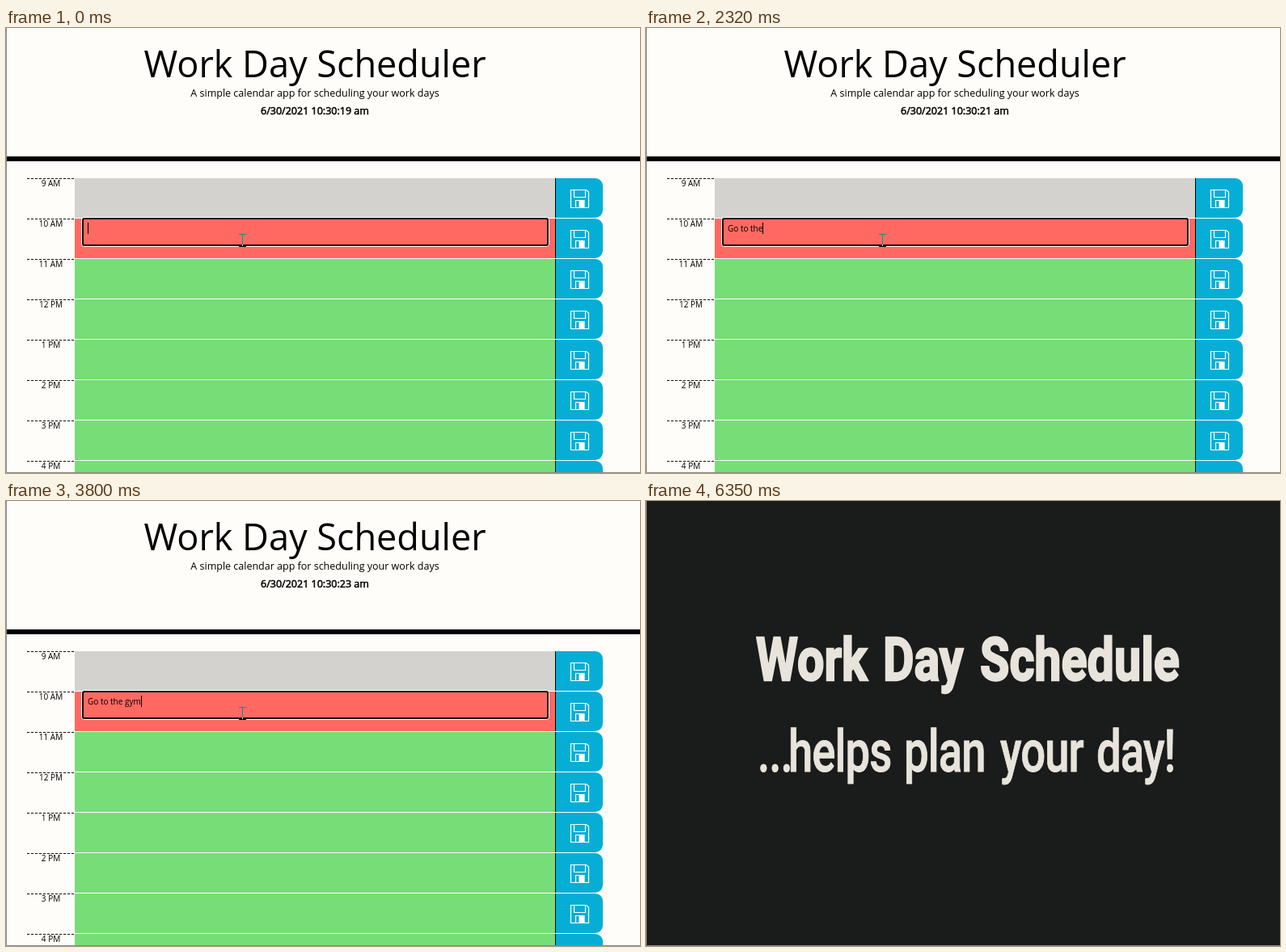
Recreate the animation shown at these times as an HTML page. Size 784 px wide and 551 px high, loop 8 s.

```html
<!DOCTYPE html>
<html lang="en">
<head>
<meta charset="utf-8">
<title>Work Day Scheduler</title>
<style>
  html, body { margin: 0; width: 100%; height: 100%; overflow: hidden; background: #fffdfa; }
  body { position: relative; font: 400 10px "Open Sans", sans-serif; color: #000; }
  svg { position: absolute; left: 0; top: 0; display: block; }
  .title { font-size: 45px; }
  .lead { font-size: 12.5px; }
  .clock { font-size: 12.5px; stroke: #000; stroke-width: .5px; }
  .mid { text-anchor: middle; }
  #note { position: absolute; left: 101px; top: 241px; height: 14px; line-height: 14px; white-space: pre; }
  #caret { display: inline-block; width: 1px; height: 14px; vertical-align: top; background: #000; }
  #pointer { mix-blend-mode: difference; }
  #card { visibility: hidden; font-family: Roboto, sans-serif; }
  #card text { fill: #e8e4dc; stroke: #e8e4dc; }
  .head { font-size: 75px; font-weight: 700; stroke-width: 2.4px; }
  .sub { font-size: 73px; font-weight: 500; stroke-width: 1px; letter-spacing: -1.2px; }
</style>
</head>
<body>
<svg width="784" height="551">
  <defs>
    <g id="save">
      <path d="M0 0H49.6A9.4 9.4 0 0 1 59 9.4V39.6A9.4 9.4 0 0 1 49.6 49H0Z" fill="#06aed5"/>
      <path d="M.5 0V49" stroke="#000"/>
      <g fill="none" stroke="#fff" stroke-width="1.2">
        <path d="M19.5 14.5H38.5L41.5 17V36.5H19.5Z"/>
        <path d="M23.5 14.5V23.5H37.5V14.5"/>
        <path d="M25.5 36.5V27.5H36V36.5"/>
      </g>
      <path d="M29.5 28H36V37H29.5Z" fill="#fff"/>
    </g>
  </defs>
  <rect width="784" height="551" fill="#fffdfa"/>
  <text class="title mid" x="382" y="61">Work Day Scheduler</text>
  <text class="lead mid" x="382" y="85">A simple calendar app for scheduling your work days</text>
  <text class="clock mid" x="382" y="107" id="clock"></text>
  <rect y="159" width="784" height="6"/>
  <g id="rows"></g>
  <rect x="93.5" y="234.5" width="578" height="36" rx="3.5" fill="none" stroke="#fff"/>
  <rect x="95" y="236" width="575" height="33" rx="2" fill="#ff6961" stroke="#101010" stroke-width="2"/>
  <path d="M.5 0V550.5H784" fill="none" stroke="#8a8a88"/>
</svg>
<div id="note"><span id="typed"></span><span id="caret"></span></div>
<svg id="pointer" width="784" height="551">
  <path id="beam" fill="#fff" d="M288 255H297V256H293V270H297V271H288V270H292V256H288Z"/>
</svg>
<svg id="card" width="784" height="551">
  <rect width="784" height="551" fill="#1a1b1b"/>
  <g id="words"></g>
  <path d="M.5 0V550.5H784" fill="none" stroke="#8a8486"/>
</svg>
<script>
const $ = id => document.getElementById(id);
const LOOP = 8000, CARD_AT = 6350;
const NOTE = 'Go to the gym.';

// [ms, value] steps
const TYPED = [[0, 0], [500, 1], [930, 2], [1050, 3], [1300, 4], [1610, 5], [1890, 7],
  [2010, 8], [2320, 9], [2470, 10], [2890, 11], [3430, 12], [3800, 13], [4200, 14]];
const SECOND = [[0, 19], [620, 20], [1610, 21], [2590, 22], [3550, 23], [4600, 24]];
const CARET = [[0, 1], [4870, 0], [5150, 1]];
const LIFT = [[0, 0], [4870, -2]];

const valueAt = (steps, t) => steps.filter(s => s[0] <= t).pop()[1];

const HOURS = ['9 AM', '10 AM', '11 AM', '12 PM', '1 PM', '2 PM', '3 PM', '4 PM'];
const fillOf = i => ['#d3d2ce', '#ff6961'][i] || '#77dd77';
$('rows').innerHTML = HOURS.map((hour, i) => `
  <g transform="translate(0 ${186 + i * 50})">
    <path d="M26 .5H85" stroke="#000" stroke-dasharray="3 2"/>
    <text class="mid" x="55.5" y="10">${hour}</text>
    <rect x="85" width="594" height="49" fill="${fillOf(i)}"/>
    <use href="#save" x="679"/>
  </g>`).join('');

const word = (kind, y, squeeze) => ([x, text]) =>
  `<text class="${kind}" transform="translate(${x} ${y}) scale(${squeeze} 1)">${text}</text>`;
$('words').innerHTML = [
  ...[[136, 'Work'], [293, 'Day'], [413, 'Schedule']].map(word('head', 222, .79)),
  ...[[138, '...'], [176, 'helps'], [319, 'plan'], [438, 'your'], [557, 'day!']].map(word('sub', 335, .745))
].join('');

function draw(t) {
  $('typed').textContent = NOTE.slice(0, valueAt(TYPED, t));
  $('clock').textContent = `6/30/2021 10:30:${valueAt(SECOND, t)} am`;
  $('caret').style.opacity = valueAt(CARET, t);
  $('beam').setAttribute('transform', `translate(0 ${valueAt(LIFT, t)})`);
  $('card').style.visibility = t >= CARD_AT ? 'visible' : 'hidden';
}

const start = performance.now();
function tick() {
  draw((performance.now() - start) % LOOP);
  requestAnimationFrame(tick);
}
draw(0);
requestAnimationFrame(tick);
</script>
</body>
</html>
```
